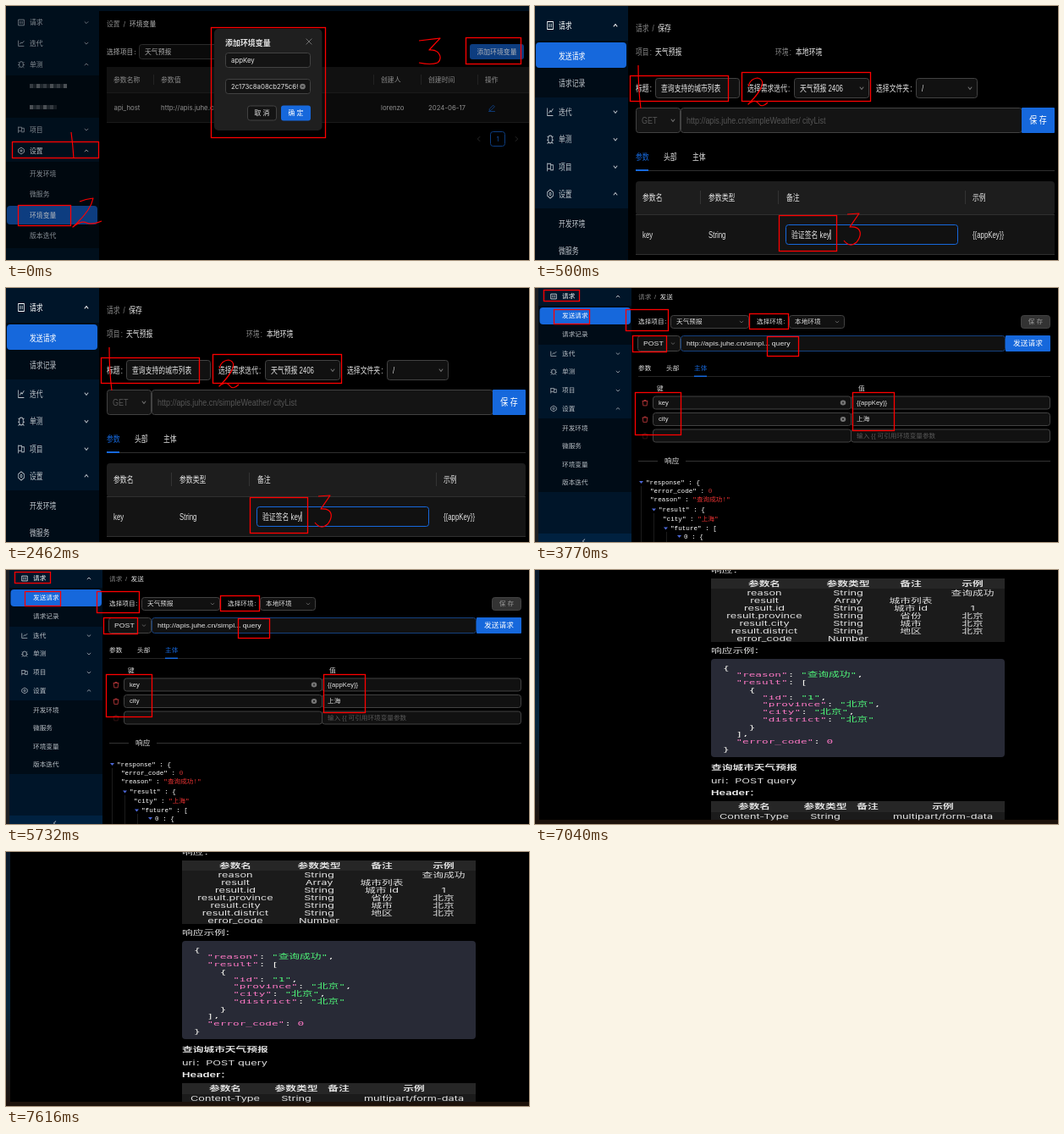
Animation of 618 by 300 pixels, one loop 8 s. Source, as an HTML page:

```html
<!DOCTYPE html>
<html lang="zh-CN">
<head>
<meta charset="utf-8">
<style>
html, body { margin: 0; width: 100%; height: 100%; overflow: hidden; background: #000; }
svg { display: block; width: 618px; height: 300px; }
text { white-space: pre; font-family: "Liberation Sans", "Noto Sans CJK SC", "Noto Sans CJK", sans-serif; }
.wide text { font-family: Inter, "Noto Sans CJK SC", "Noto Sans CJK", sans-serif; }
svg .mono { font-family: "DejaVu Sans Mono", "Noto Sans CJK SC", "Noto Sans CJK", monospace; }
svg .json { font-family: "Liberation Mono", "Noto Sans CJK SC", "Noto Sans CJK", monospace; }
</style>
</head>
<body>
<svg id="stage" viewBox="0 0 618 300"></svg>
<script>
const BLUE = '#1668dc', WHITE = '#e4e4e4', GREY = '#858585', NAVY = '#001529', DEEP = '#000c17', LINE = '#424242';
const ICONS = {
  doc: 'M-6-6H6V6H-6ZM-2-3V3M2-3V3',
  chart: 'M-6-6V6H6M-3 2L0-2 2 0 6-5',
  bug: 'M-4-2a4 4 0 0 1 8 0v4a4 4 0 0 1-8 0zM-7 1h3M4 1h3M-6-5l2 2M6-5l-2 2M-6 7l2-2M6 7l-2-2',
  flag: 'M-6-6V7M-6-5H1V3H-6M1-3H6V5H0',
  gear: 'M0-7L6-3V3L0 7-6 3V-3ZM-2 0a2 2 0 1 0 4 0a2 2 0 1 0-4 0',
  up: 'M-4 2L0-2 4 2', down: 'M-4-2L0 2 4-2', left: 'M2-5L-3 0 2 5', right: 'M-2-5L3 0-2 5',
  close: 'M-6-6L6 6M6-6L-6 6',
  edit: 'M-5 3L3-5 6-2-2 6H-5ZM-7 8H7',
  trash: 'M-6-4H6M-2-4V-6H2V-4M-5-4L-4 7H4L5-4',
  disc: 'M-3 0a3 3 0 1 0 6 0a3 3 0 1 0-6 0', cross: 'M-2-2L2 2M2-2L-2 2'
};

// Interface sizes are in CSS pixels; each scene has its own capture scale.
let out, sx, sy;
const at = (x, y) => `transform="translate(${x} ${y}) scale(${sx} ${sy})"`;
const add = markup => { out += markup; };

function text(x, y, content, fill = WHITE, { size = 14, weight = 400, anchor = 'start', cls = '' } = {}) {
  add(`<text ${at(x, y)} y="${size * 0.36}" font-size="${size}" font-weight="${weight}" fill="${fill}" text-anchor="${anchor}" class="${cls}">${content}</text>`);
}
const label = (x, y, name, fill, opt) => text(x, y, `${name}<tspan dx="2">:</tspan>`, fill, opt);
function box(x1, y1, x2, y2, fill, stroke = 'none', r = 0, width = 1) {
  const inset = stroke === 'none' ? 0 : 0.5;
  add(`<rect x="${x1 + inset}" y="${y1 + inset}" width="${x2 - x1 - 2 * inset}" height="${y2 - y1 - 2 * inset}" rx="${r}" fill="${fill}" stroke="${stroke}" stroke-width="${width}"/>`);
}
function icon(x, y, name, color = '#aaa', width = 1.4) {
  add(`<path ${at(x, y)} d="${ICONS[name]}" fill="none" stroke="${color}" stroke-width="${width}"/>`);
}
function clearIcon(x, y) {
  icon(x, y, 'disc', '#777', 6);
  icon(x, y, 'cross', '#111');
}
function pen(d) {
  add(`<path d="${d}" fill="none" stroke="#f00" stroke-width="1.2" stroke-linejoin="round"/>`);
}
const mark = (x1, y1, x2, y2) => box(x1, y1, x2, y2, 'none', '#f00', 0, 1.3);
const button = (x1, y1, x2, y2, fill, name, color = '#fff', opt = {}) => {
  box(x1, y1, x2, y2, fill, opt.stroke, opt.r ?? 3);
  text((x1 + x2) / 2, (y1 + y2) / 2, name, color, { anchor: 'middle', ...opt });
};
function field(x1, y1, x2, y2, value, color = WHITE, { end, stroke = LINE, size, fill = '#111' } = {}) {
  box(x1, y1, x2, y2, fill, stroke, 3);
  text(x1 + 7, (y1 + y2) / 2, value, color, { size });
  if (end) icon(x2 - 9, (y1 + y2) / 2, end, '#777');
}
function crumbs(x, y, first, second, color = WHITE) {
  text(x, y, `${first}<tspan dx="7">/</tspan><tspan dx="8" fill="${color}">${second}</tspan>`, GREY);
}
// Items: [y, name, icon, chevron, color]; items without an icon are children.
function menu(x, items) {
  for (const [y, name, shape, chevron, color = '#bcc2c8'] of items) {
    text(x + 28, y, name, color);
    if (shape) {
      icon(x + 18, y, shape, color);
      icon(x + (x ? 94 : 95), y, chevron, color);
    }
  }
}

function variableDialog() {
  const dim = '#8d8d8d', soft = '#848b92', dimBlue = '#0d3d80';
  box(0, 0, 618, 6, '#00101e');
  box(0, 0, 110, 300, '#000f1c');
  box(0, 82, 110, 132, '#00080f');
  box(0, 184, 110, 286, '#00080f');
  box(1, 236, 108, 258, dimBlue, 'none', 4);
  menu(0, [
    [19.5, '请求', 'doc', 'down', soft], [44, '迭代', 'chart', 'down', soft], [69, '单测', 'bug', 'up', soft],
    [146, '项目', 'flag', 'down', soft], [171, '设置', 'gear', 'up', '#b4b8bc'],
    [198, '开发环境',,, soft], [222.5, '微服务',,, soft], [247, '环境变量',,, '#b4b8bc'], [271.5, '版本迭代',,, soft]
  ]);
  const shades = ['#343a40', '#1f262c', '#4a4f54', '#171d23'];
  for (let i = 0; i < 11; i++) {
    box(28 + i * 4, 92, 32 + i * 4, 97, shades[i * 3 % 4]);
    if (i < 8) box(28 + i * 4, 117, 32 + i * 4, 122, shades[(i * 3 + 2) % 4]);
  }
  crumbs(119, 21, '设置', '环境变量', '#b5b5b5');
  label(119, 54, '选择项目', '#aaa');
  field(157, 45, 260, 63, '天气预报', '#aaa', { stroke: '#2b2b2b', fill: '#0a0a0a' });
  button(548, 45, 612, 63, dimBlue, '添加环境变量', '#b0b4ba');
  box(119, 72, 618, 102, '#111');
  box(119, 102, 618, 138, '#0b0b0b');
  box(119, 102, 618, 103, '#1a1a1a');
  box(119, 137, 618, 138, '#1a1a1a');
  for (const x of [174, 434, 490, 557]) box(x, 81, x + 1, 93, '#222');
  [[127, '参数名称'], [183, '参数值'], [443, '创建人'], [499, '创建时间'], [566, '操作']]
    .forEach(([x, name]) => text(x, 87, name, dim, { weight: 500 }));
  [[127.5, 'api_host'], [183, 'http://apis.juhe.cn/'], [443, 'lorenzo'], [499, '2024-06-17']]
    .forEach(([x, value]) => text(x, 120.5, value, dim));
  icon(574, 120, 'edit', '#0f4896');
  icon(559, 157, 'left', '#333');
  button(572, 148, 590, 166, 'none', '1', '#0f4896', { stroke: dimBlue });
  icon(603, 157, 'right', '#333');

  box(246, 27, 373.5, 147, '#1f1f1f', 'none', 5);
  text(259, 44, '添加环境变量', WHITE, { size: 16, weight: 600 });
  icon(358, 42, 'close', '#888');
  field(259, 55, 360, 73, 'appKey', WHITE, { fill: '#141414' });
  field(259, 86, 360, 104, '2c173c8a08cb275c69', WHITE, { fill: '#141414' });
  box(345, 88, 359, 102, '#141414');
  clearIcon(350.5, 95);
  button(285, 117.5, 320, 135.5, '#141414', '取 消', WHITE, { stroke: LINE });
  button(325, 117.5, 360, 135.5, BLUE, '确 定');

  mark(242, 25, 378, 156);
  mark(543, 37, 609, 69);
  mark(7, 160, 110, 180);
  mark(14, 235, 77, 260);
  pen('M77 149Q79 164 80 180');
  pen('M87 231Q94 228 103 227Q100 242 79 261Q89 253 95 256T113 254');
  pen('M488 41L513 38 500 52C513 51 516 62 510 67Q502 70 488 67');
}

function requestEditor() {
  const strong = { weight: 500 };
  box(0, 0, 110, 300, NAVY);
  box(0, 41, 110, 108, DEEP);
  box(0, 239, 110, 300, DEEP);
  box(1, 43, 108, 73, BLUE, 'none', 4);
  menu(0, [
    [23, '请求', 'doc', 'up', '#fff'], [59, '发送请求',,, '#fff'], [91, '请求记录'],
    [125, '迭代', 'chart', 'down'], [157.5, '单测', 'bug', 'down'], [190, '项目', 'flag', 'down'],
    [222, '设置', 'gear', 'up'], [257, '开发环境'], [289, '微服务']
  ]);
  crumbs(119, 26, '请求', '保存');
  label(119, 54, '项目', GREY);
  text(142, 54, '天气预报', WHITE, strong);
  label(284, 54, '环境', GREY);
  text(308, 54, '本地环境', WHITE, strong);
  label(119, 97, '标题', WHITE, strong);
  field(142, 85, 242, 109, '查询支持的城市列表');
  label(251, 97, '选择需求迭代', WHITE, strong);
  field(306, 85, 395, 109, '天气预报 2406', WHITE, { end: 'down' });
  label(403, 97, '选择文件夹', WHITE, strong);
  field(450, 85, 523, 109, '/', WHITE, { end: 'down' });
  field(119, 120, 172, 150, 'GET', '#555', { end: 'down', size: 16, fill: '#141414' });
  field(172, 120, 576, 150, 'http://apis.juhe.cn/simpleWeather/ cityList', '#555', { size: 16, fill: '#141414' });
  button(575, 120, 614, 150, BLUE, '保 存', '#fff', { size: 16, weight: 500, r: 1 });
  text(119, 178, '参数', BLUE, strong);
  text(152, 178, '头部', WHITE, strong);
  text(186, 178, '主体', WHITE, strong);
  box(119, 194, 614, 195, '#303030');
  box(119, 193, 134, 195, BLUE);
  box(119, 207, 614, 247, '#1d1d1d', 'none', 4);
  box(119, 247, 614, 294, '#141414');
  box(119, 246, 614, 247, '#303030');
  box(119, 293, 614, 294, '#303030');
  for (const x of [195, 287, 508]) box(x, 218, x + 1, 234, '#333');
  [[127, '参数名'], [205, '参数类型'], [297, '备注'], [517, '示例']].forEach(([x, s]) => text(x, 226, s, WHITE, strong));
  [[127, 'key'], [205, 'String'], [517, '{{appKey}}']].forEach(([x, s]) => text(x, 270, s));
  field(296, 258, 500, 282, '验证签名 key', WHITE, { stroke: BLUE });
  box(348.5, 264, 349.5, 276, '#ddd');

  mark(112, 82, 229, 113);
  mark(244, 78, 397, 113);
  mark(288, 247, 357, 290);
  pen('M122 70Q122 98 125 121');
  pen('M252 95Q254 86 263 85C276 88 264 104 252 116Q260 109 264 115T275 114');
  pen('M369 246L383 245 372 261C386 260 387 270 380 279Q372 286 365 277');
}

function responseView() {
  box(0, 0, 5, 300, '#1e2024');
  box(4, 0, 114, 300, NAVY);
  box(4, 21, 114, 67, DEEP);
  box(4, 154, 114, 241, DEEP);
  box(4, 290, 114, 300, '#002140');
  icon(58, 299, 'left', '#fff');
  box(5.5, 23, 113, 43, BLUE, 'none', 4);
  menu(4, [
    [10, '请求', 'doc', 'up', '#fff'], [33, '发送请求',,, '#fff'], [55, '请求记录'],
    [77.5, '迭代', 'chart', 'down'], [99, '单测', 'bug', 'down'], [121, '项目', 'flag', 'down'],
    [142.5, '设置', 'gear', 'up'], [166, '开发环境'], [187, '微服务'], [209, '环境变量'], [230, '版本迭代']
  ]);
  crumbs(122, 11, '请求', '发送');
  label(122, 40, '选择项目');
  field(160, 32, 253, 48, '天气预报', WHITE, { end: 'down' });
  label(262, 40, '选择环境');
  field(300, 32, 366, 48, '本地环境', WHITE, { end: 'down' });
  button(574, 32, 609, 48, '#333', '保 存', '#999', { stroke: LINE });
  field(121, 56, 172, 75, 'POST', WHITE, { end: 'down', size: 16 });
  field(172, 56, 556, 75, 'http://apis.juhe.cn/simpl... query', WHITE, { size: 16, stroke: '#15417e' });
  button(556, 56, 609, 75, BLUE, '发送请求', '#fff', { size: 16, weight: 500, r: 1 });
  text(122, 94.5, '参数');
  text(155, 94.5, '头部');
  text(188, 94.5, '主体', BLUE);
  box(122, 104, 609, 105, '#252525');
  box(188, 103.5, 203, 105, BLUE);
  text(144, 119, '键');
  text(382, 119, '值');
  [['key', '{{appKey}}'], ['city', '上海'], ['', '输入 {{ 可引用环境变量参数']].forEach(([key, value], i) => {
    const y = 135.5 + i * 19.5, empty = !key;
    icon(130, y, 'trash', empty ? '#441918' : '#dc4446');
    field(139, y - 8, 374, y + 8, key);
    field(373, y - 8, 609, y + 8, value, empty ? '#5a5a5a' : WHITE);
    if (!empty) clearIcon(364, y);
  });
  box(122, 204, 145, 205, '#333');
  box(178, 204, 609, 205, '#333');
  text(153, 204.5, '响应', WHITE, { size: 16, weight: 500 });

  for (const [x, y] of [[125, 234], [140, 266], [155, 288]]) box(x, y, x + 0.6, 300, '#303030');
  [
    [131, 229.5, '"response" : {', 1], [136, 239.5, '"error_code" : <tspan fill="#c33">0</tspan>'],
    [136, 250, '"reason" : <tspan fill="#e33">"查询成功!"</tspan>'], [146, 262, '"result" : {', 1],
    [151, 272.5, '"city" : <tspan fill="#e33">"上海"</tspan>'], [160, 284, '"future" : [', 1], [176, 293.5, '0 : {', 1]
  ].forEach(([x, y, line, open]) => {
    text(x, y, line, '#fff', { cls: 'json' });
    if (open) add(`<path d="M${x - 8} ${y - 1.5}h5l-2.5 3z" fill="#4d68d8"/>`);
  });

  mark(10, 2, 53, 16);
  mark(22, 25, 65, 43);
  mark(107, 25, 158, 51);
  mark(253, 30, 300, 49);
  mark(115, 56, 156, 76);
  mark(274, 57, 312, 81);
  mark(118, 123, 173, 174);
  mark(375, 123, 425, 169);
}

function apiDocument() {
  add('<rect width="5" height="300" fill="url(#edge)"/>');
  box(0, 295, 618, 300, '#1d120b');
  const row = (columns, y, cells, weight) => cells.forEach((cell, i) =>
    text(columns[i], y, cell, WHITE, { anchor: 'middle', weight }));
  text(208, 0, '响应：');
  box(208, 10, 555, 85, '#1b1b1b');
  box(208, 10, 555, 22, '#262626');
  const columns = [271, 370, 444, 517];
  row(columns, 16, ['参数名', '参数类型', '备注', '示例'], 600);
  [
    ['reason', 'String', '', '查询成功'], ['result', 'Array', '城市列表', ''], ['result.id', 'String', '城市 id', '1'],
    ['result.province', 'String', '省份', '北京'], ['result.city', 'String', '城市', '北京'],
    ['result.district', 'String', '地区', '北京'], ['error_code', 'Number', '', '']
  ].forEach((cells, i) => row(columns, 27.3 + i * 9.05, cells));
  text(208, 95, '响应示例：');

  box(208, 105, 555, 221, '#282a36', 'none', 4);
  const sample = { reason: '查询成功', result: [{ id: '1', province: '北京', city: '北京', district: '北京' }], error_code: 0 };
  JSON.stringify(sample, null, 2).split('\n').forEach((line, i) => {
    const indent = line.search(/\S/);
    const colored = line.trim()
      .replace(/"[^"]*"(:?)/g, (all, colon) => colon
        ? `<tspan fill='#ff79c6'>${all.slice(0, -1)}</tspan>:` : `<tspan fill='#50fa7b'>${all}</tspan>`)
      .replace(/: 0$/, ": <tspan fill='#ff79c6'>0</tspan>");
    text(222 + indent * 7.7, 115 + i * 8.75, colored, '#f8f8f2', { cls: 'mono' });
  });

  text(208, 233, '查询城市天气预报', WHITE, { weight: 700 });
  text(208, 249, 'uri：POST query');
  text(208, 263.5, 'Header：', WHITE, { weight: 700 });
  box(208, 273, 555, 295, '#1b1b1b');
  box(208, 273, 555, 286, '#262626');
  row([259, 343, 393, 482], 279.5, ['参数名', '参数类型', '备注', '示例'], 600);
  row([259, 343, 393, 482], 291, ['Content-Type', 'String', '', 'multipart/form-data']);
}

const LOOP = 8000;
const scenes = [
  { start: 0, draw: variableDialog, scale: [0.56, 0.56], cls: 'wide' },
  { start: 500, draw: requestEditor, scale: [0.56, 0.74] },
  { start: 3770, draw: responseView, scale: [0.545, 0.485] },
  { start: 7040, draw: apiDocument, scale: [0.91, 0.53], cls: 'wide' }
];
const stage = document.getElementById('stage');
stage.innerHTML = '<defs><linearGradient id="edge" x2="0" y2="1"><stop stop-color="#0a1a2b"/>' +
  '<stop offset=".6" stop-color="#06263c"/><stop offset="1" stop-color="#1d120b"/></linearGradient></defs>' +
  scenes.map(({ draw, scale, cls = '' }) => {
    out = '';
    [sx, sy] = scale;
    draw();
    return `<g class="${cls}">${out}</g>`;
  }).join('');
const groups = stage.querySelectorAll(':scope > g');

const origin = performance.now();
function tick() {
  const time = (performance.now() - origin) % LOOP;
  const current = scenes.findLastIndex(scene => time >= scene.start);
  groups.forEach((group, i) => { group.style.display = i === current ? '' : 'none'; });
  requestAnimationFrame(tick);
}
tick();
</script>
</body>
</html>
```
